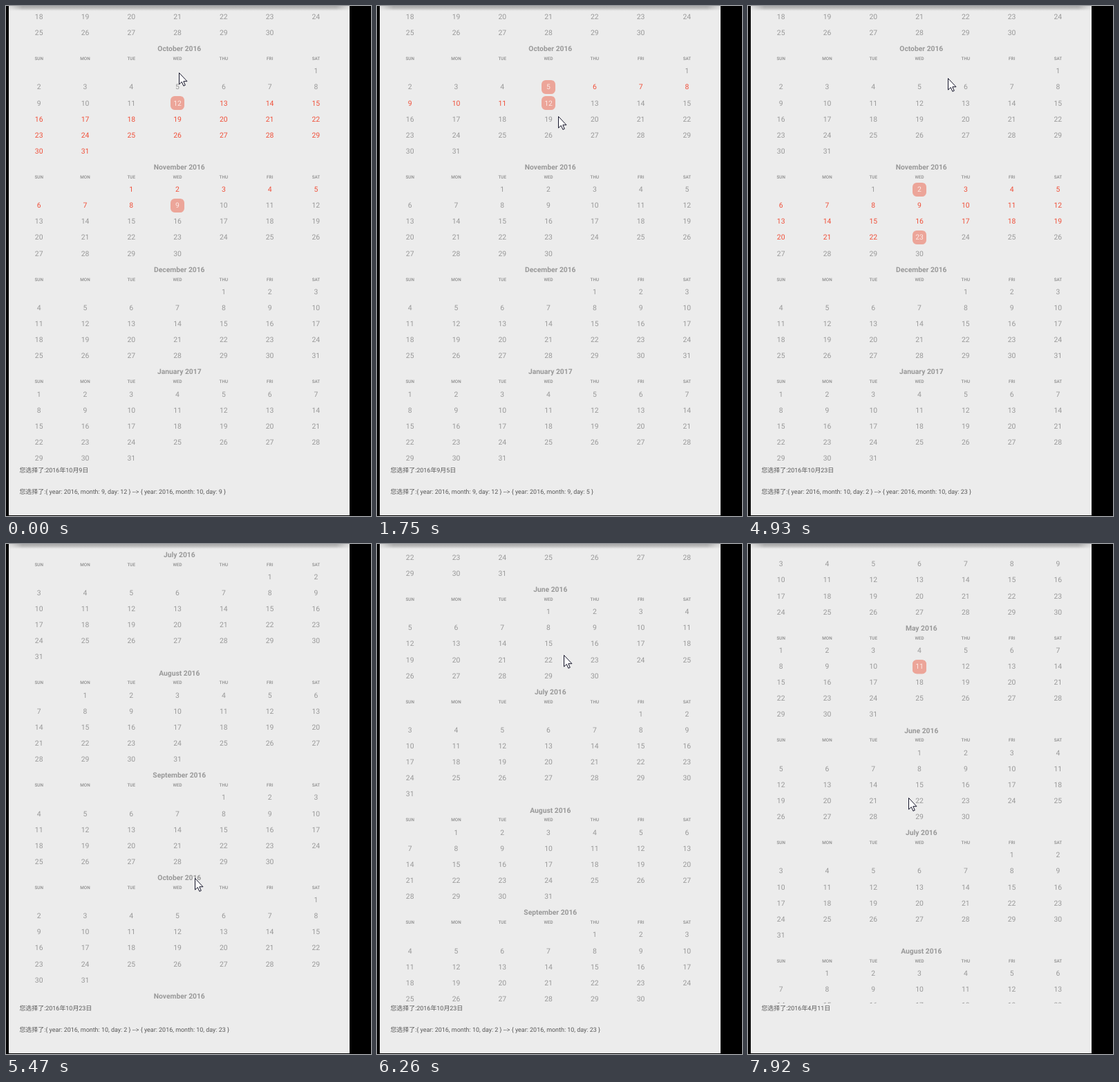
These frames come from a looping animation (528x736 px, 8 s). An HTML page:

```html
<!DOCTYPE html>
<html lang="zh">
<head>
<meta charset="utf-8">
<title>Calendar range picker</title>
<style>
  html, body { margin: 0; width: 100%; height: 100%; overflow: hidden; background: #000; }
  svg { display: block; width: 528px; height: 736px; }
  text { font-family: Roboto, "Noto Sans CJK SC", "Noto Sans CJK", sans-serif; text-rendering: geometricPrecision; }
  #months text { fill: #999; text-anchor: middle; font-size: 10.4px; }
  #months .title { font-size: 10.3px; font-weight: 700; }
  #months .week { font-size: 6.3px; font-weight: 500; fill: #8c8c8c; }
  #months .within { fill: #f0503a; }
  #months .edge { fill: #fdeae6; }
  .note { font-size: 8.95px; fill: #585858; white-space: pre; }
</style>
</head>
<body>
<svg viewBox="0 0 528 736">
  <defs>
    <clipPath id="view"><rect x="4" y="10" width="493" height="653"/></clipPath>
    <linearGradient id="shade" x2="0" y2="1">
      <stop offset="0" stop-color="#aaa"/>
      <stop offset=".4" stop-color="#b8b8b8"/>
      <stop offset="1" stop-color="#ececec"/>
    </linearGradient>
    <linearGradient id="sides">
      <stop offset="0" stop-color="#ececec" stop-opacity=".8"/>
      <stop offset=".04" stop-color="#ececec" stop-opacity="0"/>
      <stop offset=".96" stop-color="#ececec" stop-opacity="0"/>
      <stop offset="1" stop-color="#ececec" stop-opacity=".8"/>
    </linearGradient>
  </defs>
  <rect x="4" width="493" height="735" fill="#ececec"/>
  <rect x="4" width="493" height="7" fill="url(#shade)"/>
  <rect x="4" width="493" height="7" fill="url(#sides)"/>
  <g clip-path="url(#view)"><g id="months"></g></g>
  <text class="note" id="picked" x="19.4" y="673.4"></text>
  <text class="note" id="range" x="19.4" y="704"></text>
  <path id="cursor" d="M.5 .5V17L4.3 13.5L6.9 19.3L9.3 18.2L6.8 12.7H12Z" fill="#fff" stroke="#15152a" stroke-linejoin="round"/>
</svg>
<script>
const LOOP = 8000, BEAT = 133;
const YEAR = 2016, ROW = 23.1, HEAD = 32.2, EDGE = 20, BASELINE = 3.25;
const OCTOBER = 9, OCTOBER_TOP = 62;
const WEEK = ['SUN', 'MON', 'TUE', 'WED', 'THU', 'FRI', 'SAT'];

// Pointer moves: first beat, last beat, x, y. A click happens on the first beat;
// a drag carries the list along with the pointer.
const START = { x: 250, y: 96, scroll: 0, picks: [[9, 12], [10, 9]] };
const MOVES = [
  [0, 2, 254, 128],
  [5, 7, 251, 121, { click: [9, 12] }],
  [9, 13, 262, 159, { click: [9, 5] }],
  [13, 15, 258, 164],
  [19, 25, 247, 268],
  [27, 30, 249, 333, { click: [10, 2] }],
  [32, 37, 289, 104, { click: [10, 23] }],
  [37, 38, 287, 62],
  [38, 41, 273, 481.8, { drag: true }],
  [41, 43, 272, 194],
  [43, 45, 271, 392, { drag: true }],
  [45, 47, 270, 160],
  [47, 49, 269, 363.4, { drag: true }],
  [49, 50, 268, 203],
  [50, 53, 250, 176],
  [55, 59, 232, 366, { click: [4, 11] }],
];

const byId = id => document.getElementById(id);
const months = byId('months');
const make = (name, attrs, text = '') => {
  const node = document.createElementNS('http://www.w3.org/2000/svg', name);
  for (const key in attrs) node.setAttribute(key, attrs[key]);
  node.textContent = text;
  return months.appendChild(node);
};
const place = (node, x, y) => node.setAttribute('transform', `translate(${x} ${y})`);

const colX = c => 47.7 + 66.78 * c;
const order = ([m, d]) => m * 32 + d;
const firstSlot = m => new Date(YEAR, m, 1).getDay();
const length = m => new Date(YEAR, m + 1, 0).getDate();
const monthHeight = m => HEAD + ROW * Math.ceil((firstSlot(m) + length(m)) / 7);

const days = new Map();
const marks = [0, 1].map(() => make('rect', { width: EDGE, height: EDGE, rx: 6, fill: '#eca599' }));

function addMonth(m, top) {
  const name = new Date(YEAR, m, 1).toLocaleString('en-US', { month: 'long', year: 'numeric' });
  make('text', { class: 'title', x: 250.8, y: top + BASELINE }, name);
  WEEK.forEach((day, c) => make('text', { class: 'week', x: colX(c), y: top + 16 }, day));
  for (let d = 1; d <= length(m); d++) {
    const slot = firstSlot(m) + d - 1;
    const x = colX(slot % 7), y = top + 32.1 + ROW * Math.floor(slot / 7);
    days.set(order([m, d]), { x, y, node: make('text', { x, y: y + BASELINE }, d) });
  }
}

// March 2016 to January 2017, stacked around October.
let top0 = OCTOBER_TOP;
for (let m = 2; m < OCTOBER; m++) top0 -= monthHeight(m);
for (let m = 2; m <= 12; m++) {
  addMonth(m, top0);
  top0 += monthHeight(m);
}

function stateAt(beat) {
  let { x, y, scroll, picks } = START;
  for (const [from, to, toX, toY, { click, drag } = {}] of MOVES) {
    if (beat < from) break;
    const p = Math.min(1, (beat - from) / (to - from));
    const dy = (toY - y) * p;
    x += (toX - x) * p;
    y += dy;
    if (drag) scroll += dy;
    // A click closes an open range or begins a new one.
    if (click) picks = picks.length === 1 ? [...picks, click] : [click];
  }
  return { x, y, scroll, picks };
}

const brief = ([m, d]) => `{ year: ${YEAR}, month: ${m}, day: ${d} }`;

function showPicks(picks) {
  const ends = picks.map(order);
  const low = Math.min(...ends), high = Math.max(...ends);
  days.forEach(({ node }, key) => {
    node.setAttribute('class', ends.includes(key) ? 'edge' : key > low && key < high ? 'within' : '');
  });
  marks.forEach((mark, i) => {
    const { x, y } = days.get(ends[i] ?? ends[0]);
    place(mark, Math.round(x - EDGE / 2), Math.round(y - EDGE / 2));
  });
  const [m, d] = picks[picks.length - 1];
  byId('picked').textContent = `您选择了:${YEAR}年${m}月${d}日`;
  byId('range').textContent = picks.length > 1 ? `您选择了:${picks.map(brief).join(' --> ')}` : '';
}

let shown = -1;
function draw(time) {
  const beat = Math.floor(time % LOOP / BEAT);
  if (beat === shown) return;
  shown = beat;
  const { x, y, scroll, picks } = stateAt(beat);
  showPicks(picks);
  place(months, 0, scroll);
  place(byId('cursor'), Math.round(x), Math.round(y));
}

const began = performance.now();
(function loop() {
  draw(performance.now() - began);
  requestAnimationFrame(loop);
})();
</script>
</body>
</html>
```
